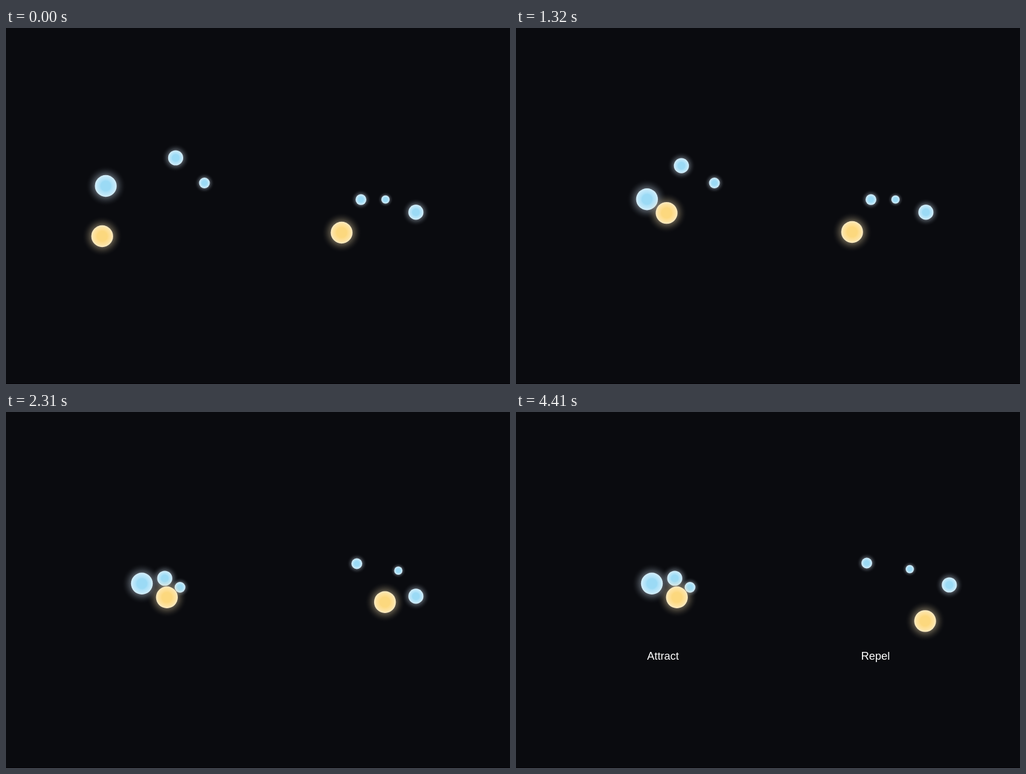
An HTML page with a canvas for the animation above (4530 ms loop, 842x595 px).

```html
<!DOCTYPE html>
<html lang="en">
<head>
<meta charset="utf-8">
<title>Attract and Repel</title>
<style>
  html, body { margin: 0; width: 100%; height: 100%; overflow: hidden; background: #0a0b0f; }
  canvas { display: block; }
</style>
</head>
<body>
<canvas id="stage" width="842" height="595"></canvas>
<script>
const ctx = document.getElementById('stage').getContext('2d');
const W = 842, H = 595, LOOP = 4530, STEP = 30;

const BLUE = { core: '#9bdaf5', mid: '#ace0f7', outer: '#bfe7f9', rim: '#d6effb', glow: '200,218,234' };
const GOLD = { core: '#fcd87e', mid: '#fddc8c', outer: '#fde3a2', rim: '#feecc6', glow: '236,216,168' };
const BIG = 18.2, MEDIUM = 12.6, SMALL = 9, TINY = 6.9;

// Each ball follows one quadratic curve (from, bend, to) between two times.
// easeOut and easeIn are the two handles of its timing curve.
const ball = (r, skin, start, end, from, bend, to, easeOut = 1 / 3, easeIn = 2 / 3) =>
  ({ r, skin, start, end, from, bend, to, easeOut, easeIn });

const balls = [
  ball(BIG, BLUE, 480, 1560, [166.7, 264], [194.5, 285.8], [227, 286.8]),
  ball(MEDIUM, BLUE, 930, 2230, [283.4, 217], [265, 247.5], [265.2, 278]),
  ball(SMALL, BLUE, 1350, 2310, [331.5, 259], [317, 280], [290.7, 293]),
  ball(SMALL, BLUE, 1520, 2400, [593, 286.8], [588, 269.6], [586, 252.5]),
  ball(TINY, BLUE, 1590, 2490, [634, 286.7], [646, 274.6], [657.9, 262.6]),
  ball(MEDIUM, BLUE, 2580, 3510, [684.8, 307.9], [705.7, 298], [723.9, 289]),
  ball(BIG, GOLD, 0, 1800, [160.7, 348], [202, 304], [268.8, 309.8], 0.44, 0.54),
  ball(BIG, GOLD, 1190, 3720, [560.7, 342], [607.5, 282.3], [683.5, 349.4], 0.33, 0.31)
];

const labels = [{ text: 'Attract', x: 219 }, { text: 'Repel', x: 576.5 }];
const TYPE_START = 2370, TYPE_END = 3720;

const progress = (t, start, end) => Math.min(1, Math.max(0, (t - start) / (end - start)));

// cubic-bezier(a, 0, b, 1), solved by bisection
function ease(p, a, b) {
  let lo = 0, hi = 1;
  for (let i = 0; i < 24; i++) {
    const s = (lo + hi) / 2, q = 1 - s;
    if (3 * a * s * q * q + 3 * b * s * s * q + s * s * s < p) lo = s; else hi = s;
  }
  return lo * lo * (3 - 2 * lo);
}

function position(b, t) {
  const u = ease(progress(t, b.start, b.end), b.easeOut, b.easeIn), v = 1 - u;
  return [0, 1].map(i => v * v * b.from[i] + 2 * u * v * b.bend[i] + u * u * b.to[i]);
}

function disc(x, y, r, fill) {
  ctx.fillStyle = fill;
  ctx.beginPath();
  ctx.arc(x, y, r, 0, Math.PI * 2);
  ctx.fill();
}

function drawBall(b, t) {
  const [x, y] = position(b, t);
  const { r, skin } = b, reach = r * 1.85;
  const halo = ctx.createRadialGradient(x, y, r - 1, x, y, reach);
  for (let i = 0; i <= 8; i++) {
    halo.addColorStop(i / 8, `rgba(${skin.glow},${0.4 * (1 - i / 8) ** 1.8})`);
  }
  disc(x, y, reach, halo);

  const body = ctx.createRadialGradient(x, y, 0, x, y, r);
  body.addColorStop(0.45, skin.core);
  body.addColorStop(0.57, skin.mid);
  body.addColorStop(0.8, skin.outer);
  body.addColorStop(1, skin.rim);
  disc(x, y, r, body);
}

function drawLabels(t) {
  const done = progress(t, TYPE_START, TYPE_END);
  ctx.font = '18.4px "Liberation Sans", Helvetica, Arial, sans-serif';
  ctx.fillStyle = '#fff';
  for (const { text, x } of labels) {
    ctx.fillText(text.slice(0, Math.floor(done * text.length)), x, 414);
  }
}

function draw(t) {
  ctx.fillStyle = '#0a0b0f';
  ctx.fillRect(0, 0, W, H);
  ctx.fillStyle = '#050306';
  ctx.fillRect(0, H - 1, W, 1);
  balls.forEach(b => drawBall(b, t));
  drawLabels(t);
}

const begin = performance.now();
function tick() {
  const t = (performance.now() - begin) % LOOP;
  draw(Math.floor(t / STEP) * STEP);
  requestAnimationFrame(tick);
}
tick();
</script>
</body>
</html>
```
